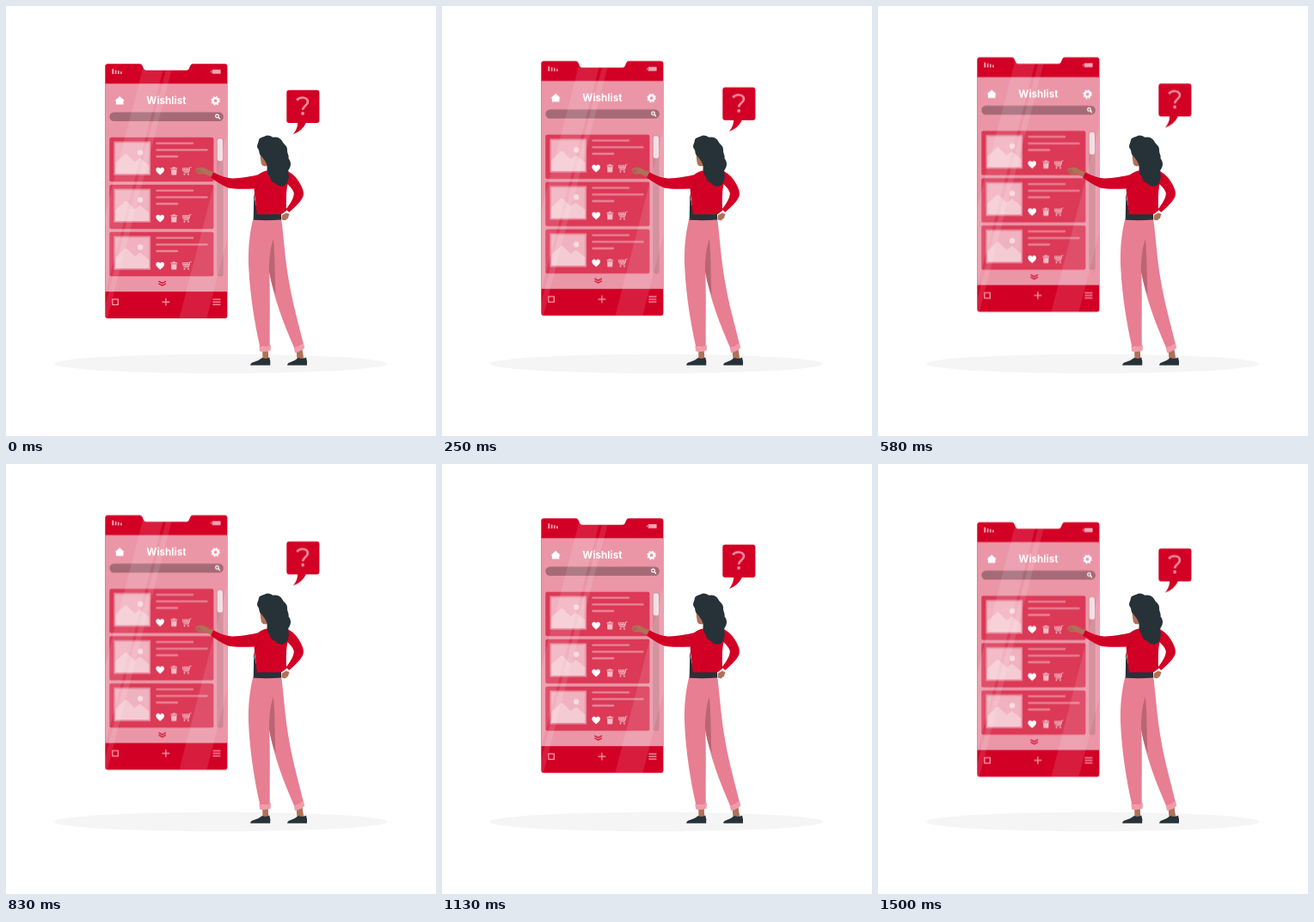
These frames come from a looping animation (500x500 px, 1.54 s). An HTML page:

```html
<!DOCTYPE html>
<html lang="en">
<head>
<meta charset="utf-8">
<title>Wishlist</title>
<style>
  html, body { margin: 0; width: 100%; height: 100%; overflow: hidden; background: #fff; }
  svg { display: block; width: 100%; height: 100%; }
  .float { animation: float 1540ms -8ms infinite; }
  /* 37 even ticks: 17 up, 19 down, one back to the start */
  @keyframes float {
    0% { transform: translateY(0); animation-timing-function: steps(17); }
    45.946% { transform: translateY(-9.2px); animation-timing-function: steps(19); }
    97.297% { transform: translateY(.5px); animation-timing-function: steps(1); }
    100% { transform: translateY(0); }
  }
  .red { fill: #d30025; }
  .dark { fill: #263238; }
  .skin { fill: #b17058; }
  .pants { fill: #e87e91; }
  .cuff { fill: #f09bab; }
  .soft { fill: #f2a6b3; }
  .line { fill: none; stroke: #f2a6b3; stroke-width: 1.2; }
  .title { font: 700 11.7px Inter, "Open Sans", sans-serif; fill: #fff; text-anchor: middle; }
</style>
</head>
<body>
<svg viewBox="0 0 500 500">
  <defs>
    <clipPath id="body">
      <path id="shell" d="M118.3 67.3H155.5Q157.8 67.3 158.6 69.4L160.2 73Q160.9 74.7 162.8 74.7H210Q211.9 74.7 212.7 73L214.2 69.4Q215 67.3 217.2 67.3H254.4Q257.4 67.3 257.4 70.3V360.2Q257.4 363.2 254.4 363.2H118.3Q115.3 363.2 115.3 360.2V70.3Q115.3 67.3 118.3 67.3Z"/>
    </clipPath>
    <g id="card">
      <rect x="120.3" y="152.7" width="121.1" height="51.5" rx="2" fill="#db3956"/>
      <rect x="125.4" y="157.5" width="42.7" height="39.2" fill="#e88c9e"/>
      <rect x="127.2" y="159.3" width="39.1" height="35.6" fill="#f1b2bf"/>
      <path d="M127.2 182.3L138 172.2Q139.2 171.2 140.4 172.3L149.6 181.2L154.4 177.4Q155.6 176.6 156.8 177.6L166.3 185.3V194.9H127.2Z" fill="#f5cbd3"/>
      <circle cx="156.2" cy="170.4" r="3.2" fill="#f8dbe0"/>
      <path d="M175.4 159.6H217.2M175.4 167.4H233.6M175.4 175H199.2" fill="none" stroke="#e98597" stroke-width="2.3" stroke-linecap="round"/>
      <path d="M179.2 196.6C176 194.2 174.3 192.5 174.3 190.3C174.3 187.5 177.8 186.9 179.2 189.3C180.6 186.9 184.1 187.5 184.1 190.3C184.1 192.5 182.4 194.2 179.2 196.6Z" fill="#fff"/>
      <path d="M191.4 188.2H193.7V187.2H196.9V188.2H199.2V189.6H191.4ZM192 190.3H198.6L198.2 196.4H192.4Z" fill="#f3bbc5"/>
      <path d="M215.6 187.6H213.8L212.2 193.8H206.6M205.2 188.7H213.4L212.7 192.3H206.2ZM205.6 190.5H213M207.9 188.7L208.4 192.3M210.6 188.7L210.3 192.3" fill="none" stroke="#f3bbc5" stroke-width=".85"/>
      <circle cx="207.5" cy="195.7" r=".95" fill="#f3bbc5"/>
      <circle cx="212" cy="195.7" r=".95" fill="#f3bbc5"/>
    </g>
  </defs>

  <ellipse cx="249.5" cy="416" rx="193.6" ry="11.2" fill="#f5f5f5"/>

  <g class="float">
    <use href="#shell" class="red"/>
    <rect x="115.3" y="90.3" width="142.1" height="241.8" fill="#eb96a7"/>

    <path class="soft" d="M123.3 73.3h1.9v5.8h-1.9zM126.7 74.5h1.8v4.6h-1.8zM129.9 75.3h1.8v3.8h-1.8zM133 76.3h1.8v2.8h-1.8zM239.9 74h9.7v4.8h-9.7zM238.2 75.2h1.1v2.4h-1.1z"/>

    <path d="M132.2 105L138 110.2H136.5V114.6H127.9V110.2H126.4Z" fill="#fff"/>
    <text class="title" x="186.4" y="114.3">Wishlist</text>
    <g fill="none" stroke="#fff">
      <circle cx="243.6" cy="110.2" r="3" stroke-width="2.2"/>
      <circle cx="243.6" cy="110.2" r="4.5" stroke-width="1.5" stroke-dasharray="1.9 1.634"/>
    </g>
    <rect x="120.3" y="123.5" width="132.6" height="10.4" rx="5.2" fill="#a56a76"/>
    <g fill="none" stroke="#fff" stroke-width="1.2">
      <circle cx="245.5" cy="128" r="1.8"/>
      <path d="M246.8 129.3L248.9 131.4" stroke-width="1.4"/>
    </g>

    <use href="#card"/>
    <use href="#card" y="55"/>
    <use href="#card" y="110"/>

    <rect x="245.2" y="153.6" width="7.4" height="160.8" rx="2.6" fill="#cf8593"/>
    <rect x="245.8" y="154.2" width="6.2" height="26" rx="2.2" fill="#f3e0e4"/>
    <path d="M177.4 320L181.7 322.3L186 320M177.4 322.7L181.7 325L186 322.7" fill="none" stroke="#d30025" stroke-width="1.2"/>

    <rect class="line" x="123.9" y="341" width="6.4" height="6.4"/>
    <path class="line" d="M181.5 344.2H190.3M185.9 339.8V348.6M240.4 341.2H249.4M240.4 344.2H249.4M240.4 347.2H249.4"/>

    <g clip-path="url(#body)" fill="#fff" fill-opacity=".11">
      <path d="M160.5 67H184.5L108 363H84Z"/>
      <path d="M188 67H194.5L118 363H111.5Z"/>
      <path d="M201.5 363H233.5L310 67H278Z"/>
    </g>

    <path class="red" d="M329.3 97.7H361.4Q364.4 97.7 364.4 100.7V133Q364.4 136 361.4 136H348.8Q344.5 145.5 333.8 149Q338.8 143.5 339.2 136H329.3Q326.3 136 326.3 133V100.7Q326.3 97.7 329.3 97.7Z"/>
    <path d="M338.2 109.6C339.7 107.5 341.9 106.5 344.6 106.5C348.4 106.5 350.9 108.4 350.9 111.4C350.9 115.8 345.1 116.2 345.1 120.7" fill="none" stroke="#f18c9e" stroke-width="2.7"/>
    <circle cx="345.1" cy="125" r="1.9" fill="#f18c9e"/>
  </g>

  <g>
    <path class="skin" d="M298.2 399L304.8 399L305.2 411H298.4ZM337.4 398.5L344.2 397L346.3 411H338.5Z"/>
    <path class="dark" d="M284.2 417.7Q284 415.2 287.5 414.2Q294 412.6 298 409Q302.5 411 306.2 408.6Q307.8 412.5 307.2 417.7ZM327.2 417.7Q327 415.2 330.5 414.2Q336 412.6 340 409Q345 411 349 408.8Q350.4 412.5 350 417.7Z"/>
    <path class="pants" d="M287.2 248H320.2C323.2 269 324.2 294 329.5 323C333.6 347 340.6 371 346 393.5L335.8 399C323.5 371 311 339 306.2 309C307.4 338 306.4 371 306.8 396H295.2C288.8 367 283.8 336 282.2 304C281.2 283 283.2 264 287.2 248Z"/>
    <path d="M310.8 271C307.2 281 306 294 305.9 308C307.6 318 310.2 328 313.6 336C312.1 314 313.2 292 310.8 271Z" fill="#ba6574"/>
    <path class="cuff" d="M294.2 395.6Q301 397.2 308 394.2L307.7 400.4Q301.5 402.8 295.2 401.4ZM334.7 397.4Q341 396 346 391.8L347.2 397.4Q342.2 402.2 336 403Z"/>

    <path class="skin" d="M242 193L236.5 191.6L231.3 188.5Q227.5 186.9 223.5 188L220.4 190L221 193.2L224.2 195.4L230.5 195.2L239.5 199Z"/>
    <path d="M221.3 191.4L226 190.6M222.2 193.4L227.2 192.6" fill="none" stroke="#965743" stroke-width=".7"/>
    <path class="skin" d="M326 240.5L320.8 243.2L320.5 248.3L324.4 249.6L328 246.4L329.5 242Z"/>
    <path class="dark" d="M288.3 220L287.7 248.8Q304 249.6 320 248.6V240H292.5Z"/>
    <path class="red" d="M241.2 193.2C248.2 197 256 200 263 200.4C274 200 285 198.2 293 196.2C297.5 192.8 301.5 191.2 306 191H324C330 192.2 336.5 197.4 340.7 204.5C344 210 346.4 215 345.9 219.6C345 226 336 234 329.3 239.8L325.4 236.5C330.8 230 334.8 223 334.8 217.8C334 213.6 330.4 209.8 327.5 207.2C325.4 216 325.8 230 326.1 238L320.3 242.3H291.8C291 233 289 220 288.6 212.4C277 213 266 213.2 258.5 211.6C251.2 208.6 244 203.8 238 199.5Z"/>
    <path d="M295.8 205C291.4 209.6 289 217.5 288.5 224" fill="none" stroke="#a9001c" stroke-width=".9"/>

    <path class="skin" d="M296.2 168Q295 176 296.8 183.5Q298.8 187.4 303.4 186V192H312V170Z"/>
    <path class="dark" d="M296.8 174.5C293.4 171.5 295.3 168.7 293 166C290.6 162.4 293.5 160 293.7 157C294 152.8 298.4 152.6 300.8 151.4C304.4 149.5 308 151 310.6 152.8C314.6 151.8 319.4 153.2 321.2 157.2C323 161.2 327.2 162 327 167.2C326.6 171.2 329.3 173.2 328.5 177.2C331.8 181 331.6 186 329.2 189.6C326.4 193 330.2 196.2 328.3 201.2C327.8 206.5 324 210.2 318.8 209.4C315 209.6 313.8 205.8 311.2 205C306.4 203.2 308.2 198.8 304.8 196C302.6 192.8 304.7 189.2 303.6 185.5C302.2 181 299.3 177 296.8 174.5Z"/>
  </g>
</svg>
</body>
</html>
```
